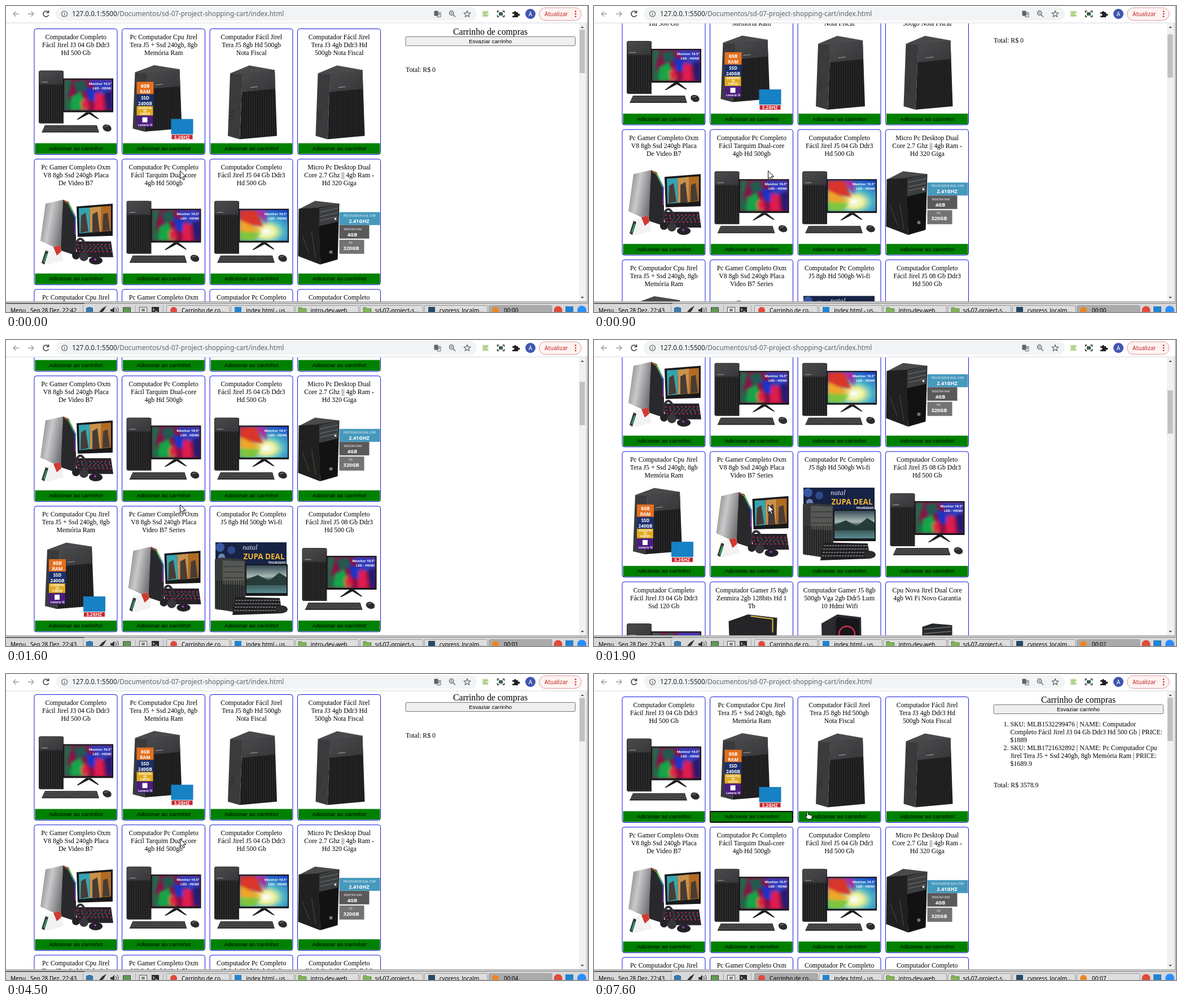
Animation of 1031x543 px, one loop 8000 ms. Source, as an HTML page:

```html
<!DOCTYPE html>
<html lang="pt">
<meta charset="utf-8">
<title>Carrinho de compras</title>
<style>
html, body { margin: 0; width: 100%; height: 100%; overflow: hidden; background: #fff; }
svg { display: block; }
#stage { width: 1031px; height: 543px; }
.serif { font: 11.8px "Liberation Serif", serif; }
.sans { font: 9.87px "Liberation Sans", sans-serif; }
.ui { font: 10px "Noto Sans", sans-serif; }
.url { font: 11.75px "Noto Sans", sans-serif; }
.label { font: bold 8px "Open Sans", sans-serif; fill: #fff; }
.mid { text-anchor: middle; }
</style>
<svg id="stage" viewBox="0 0 1031 543">
<defs>
  <pattern id="grille" width="4" height="4" patternUnits="userSpaceOnUse"><path d="M0 0h2v4h-2z" fill="#111" opacity=".55"/></pattern>
  <filter id="soft"><feGaussianBlur stdDeviation="2.5"/></filter>
  <linearGradient id="silver" x2="1" y2=".4"><stop stop-color="#777"/><stop offset=".5" stop-color="#c9c9cb"/><stop offset="1" stop-color="#77787a"/></linearGradient>
  <linearGradient id="panel" y2="1"><stop stop-color="#4b4b4d"/><stop offset="1" stop-color="#37373a"/></linearGradient>
  <linearGradient id="rgb" x2="1" y2="1"><stop stop-color="#d33"/><stop offset=".35" stop-color="#5c4"/><stop offset=".7" stop-color="#38c"/><stop offset="1" stop-color="#b3c"/></linearGradient>
  <linearGradient id="lake" x2="0" y2="1"><stop stop-color="#354a55"/><stop offset=".4" stop-color="#a9b9b5"/><stop offset=".55" stop-color="#2c4038"/><stop offset="1" stop-color="#5a8a93"/></linearGradient>
  <radialGradient id="glow" cx=".55" cy=".7" r=".75"><stop stop-color="#fff"/><stop offset=".25" stop-color="#e8ef9a"/><stop offset=".5" stop-color="#4cb4c8"/><stop offset="1" stop-color="#1a49c8"/></radialGradient>

  <g id="kit">
    <path d="M8 76l2-2h38l4 1v93h-42l-2-2z" fill="#2b2b2d"/>
    <path d="M9 75h42v23h-42z" fill="url(#panel)"/>
    <path d="M9 100h42v66h-42z" fill="url(#grille)"/>
    <path d="M13 94h11v1h-11z" fill="#aaa"/>
    <path d="M51 88h89v60h-89z" fill="#161618"/>
    <path d="M92 148h8l15 12h-3l-15-9-19 10h-3z" fill="#1c1c1e"/>
    <path d="M19 171h92l4 13h-102z" fill="#343436"/>
    <path d="M19 174h91M18 177h94M16 180h97" stroke="#888" stroke-width=".8" stroke-dasharray="3 1.2"/>
    <ellipse cx="129" cy="176" rx="8" ry="6" fill="#2c2c2e" transform="rotate(20 129 176)"/>
    <path d="M124 174l7-2" stroke="#999"/>
  </g>
  <g id="caption" class="mid label" style="font-size:6px"><text x="117" y="99">Monitor 19.5"</text><text x="120" y="107">LED - HDMI</text></g>
  <g id="combo">
    <use href="#kit"/>
    <svg x="53" y="90" width="85" height="55"><path d="M0 0h85v55h-85z" fill="#8c1146"/>
      <g filter="url(#soft)"><path d="M0 0h14l-8 30 12 25h-18z" fill="#1e6c4a"/><path d="M12 30l18-8 12 33h-30z" fill="#16a548"/><path d="M16 4l22-4 2 18-18 6z" fill="#215a50"/><path d="M38 14l20 4-3 22-12-4z" fill="#1835c9"/><path d="M42 0h43v18l-20 10z" fill="#303dbb"/><path d="M56 24l12 2 3 29h-18z" fill="#e01b50"/><path d="M72 22l13-2v35h-9z" fill="#1b1f78"/><path d="M30 40l9-8 6 18-12 5z" fill="#e02343"/></g></svg>
    <use href="#caption"/>
  </g>
  <g id="rainbow">
    <use href="#kit"/>
    <svg x="53" y="90" width="85" height="55"><path d="M0 0h85v55h-85z" fill="url(#glow)"/>
      <g filter="url(#soft)"><path d="M0 0h30l12 30-42-6z" fill="#d9352c"/><path d="M0 18l40 18-40 8z" fill="#f0a52c"/><path d="M0 38l38 2-12 15h-26z" fill="#7fc53c"/><path d="M28 0h18l2 26z" fill="#b02a9c"/></g></svg>
    <use href="#caption"/>
  </g>
  <g id="tower">
    <path d="M36 79l34-14 45 8-57 9z" fill="#4a4a4c"/>
    <path d="M36 79l22 2-5 115-21-6z" fill="#3b3b3d"/>
    <path d="M58 81l57-8 4 117-66 6z" fill="#262628"/>
    <path d="M58 81l57-8 1 33-59 6z" fill="url(#panel)"/>
    <path d="M57 113l59-6 2 82-64 6z" fill="url(#grille)"/>
    <path d="M72 104l13-1.500" stroke="#aaa"/><path d="M36 150l8-6M36 156l8-6M36 162l8-6" stroke="#222"/>
  </g>
  <g id="offer">
    <use href="#tower" transform="translate(-13 6) scale(1 .9)"/>
    <path d="M26 94h30v22h-30z" fill="#e4701e"/><path d="M26 116h30v21h-30z" fill="#1b2f6b"/><path d="M26 137h29v17h-29z" fill="#e0aa20"/><path d="M26 154h29v20h-29z" fill="#4b1d80"/>
    <g class="mid label"><text x="41" y="104">8GB</text><text x="41" y="114">RAM</text><text x="41" y="125">SSD</text><text x="41" y="135">240GB</text>
    <g style="font-size:4.500px"><text x="41" y="142">GARANTIA</text><text x="41" y="147">DE</text><text x="41" y="152">6 MESES</text><text x="41" y="172">Lumaria 10</text></g></g>
    <path d="M36 157h9v9h-9z" fill="#fff"/>
    <path d="M87 160h39v27h-39z" fill="#1681c4"/><path d="M88 188h37v8h-37z" fill="#c9232c"/>
    <text x="106" y="195" class="mid label">3.2GHZ</text>
  </g>
  <g id="gamer">
    <path d="M20 79l31-7-3 90-37-17z" fill="url(#silver)"/>
    <path d="M51 72l10 4 13 27v68l-27-9z" fill="#29292c"/>
    <path d="M52 73l9 6 12 25v30" fill="none" stroke="url(#rgb)" stroke-width="2"/>
    <path d="M75 84l64-5v57l-62 2z" fill="#19191b"/>
    <path d="M79 87l19-1 1 44-19 2z" fill="#35a4b2"/><path d="M98 86l20-2v45l-19 1z" fill="#c8924c"/><path d="M118 84l18-1v44l-18 2z" fill="#b16b23"/>
    <path d="M83 100l8-5 5 33-14 3zM103 98l9-5 4 36-13 1zM122 98l8-3 4 31-13 2z" fill="#493c35"/>
    <path d="M72 146h64l4 28h-62z" fill="#27212a"/><path d="M76 152h60M77 158h61M79 164h60" stroke="#a3344e" stroke-width="2" stroke-dasharray="3 4"/><path d="M84 155h54M88 161h46" stroke="#2a8a86" stroke-width="1.500" stroke-dasharray="2 6"/>
    <path d="M72 166q2-28 12-24 10 8 6 26" fill="none" stroke="#303034" stroke-width="4"/><circle cx="74" cy="171" r="7" fill="#232326"/><circle cx="88" cy="173" r="8" fill="#37373b"/>
    <ellipse cx="109" cy="180" rx="12" ry="7" fill="#222226"/><circle cx="108" cy="178" r="2" fill="#a3c"/>
    <path d="M19 160l27-7 6 27-30 8z" fill="#f2f2f2"/><path d="M34 156l12-3 2 11-8 7z" fill="#d03a30"/><path d="M13 184l7-22 5 2-7 23z" fill="#333"/><path d="M16 182l5-15 2 1-5 16z" fill="#2aa566"/>
  </g>
  <g id="micro">
    <path d="M2 89l29-15 43 5-36 8z" fill="#4a4a48"/><path d="M2 88l36-2 2 101-39-15z" fill="#20201f"/><path d="M37 86l37-7-3 99-31 9z" fill="#121213"/>
    <path d="M38 87l35-8-1 32-34 8z" fill="#3c3d3e"/><path d="M40 94l32-7M40 102l32-7M40 109l31-7" stroke="#77797a"/><circle cx="67" cy="106" r="2" fill="#ddd"/><circle cx="59" cy="165" r="3" fill="#777"/><path d="M8 135l13 34M25 130l7 46" stroke="#4b4b4a"/>
    <path d="M74 94h72v23h-72z" fill="#4699bd"/><path d="M74 117h53v24h-53z" fill="#59595b"/><path d="M74 143h44v25h-44z" fill="#727375"/>
    <g class="mid label" style="font-size:9px"><text x="109" y="113">2.41GHZ</text><text x="97" y="137">4GB</text><text x="95" y="161">320GB</text>
    <g style="font-size:4.500px;font-weight:400"><text x="110" y="102">PROCESSADOR DUAL CORE</text><text x="98" y="126">MEMÓRIA RAM</text><text x="94" y="150">HD</text></g></g>
  </g>
  <g id="sale">
    <path d="M10 64h126v42h-126z" fill="#172345"/><circle cx="18" cy="73" r="8" fill="#3957a0"/><circle cx="38" cy="78" r="7" fill="#2f4888"/><circle cx="21" cy="90" r="6" fill="#6d83b7"/>
    <text x="58" y="77" style="font:italic 13px 'Liberation Serif',serif" fill="#dce4f5">natal</text>
    <text x="96" y="94" class="mid label" style="font-size:13.500px;fill:#f2b632">ZUPA DEAL</text><text x="119" y="102" class="mid label" style="font-size:6px">THURSDAY</text>
    <path d="M63 103h75v56h-75z" fill="#17191c"/><path d="M65 105h71v49h-71z" fill="url(#lake)"/><path d="M65 130l20-8 20 10 18-14 13 8v14h-71z" fill="#263c38"/>
    <path d="M9 94l12-3 42 4v96l-54-9z" fill="#38393a"/><path d="M23 96l38 2v42l-38-2z" fill="#565855"/><path d="M24 107h36M24 117h36M24 127h36" stroke="#292a2a"/><path d="M10 132h51v52h-51z" fill="url(#grille)"/>
    <path d="M45 161l79 2 4 27-88 3z" fill="#202022"/><path d="M46 167h78M45 173h80M44 179h82M43 185h84" stroke="#737377" stroke-width="2" stroke-dasharray="3.500 1.500"/><ellipse cx="127" cy="183" rx="11" ry="7" fill="#2c2c2e"/>
  </g>
  <g id="gold"><path d="M33 70l34-12 52 6-4 120h-78z" fill="#252528"/><path d="M72 61l39 5v24" fill="none" stroke="#d9bd45" stroke-width="2"/></g>
  <g id="ring"><path d="M42 74l28-16 42 5 2 120h-70z" fill="#2b2b30"/><path d="M68 63l41 3v100h-44z" fill="#17171a"/><circle cx="87" cy="93" r="14" fill="none" stroke="#d52b50" stroke-width="2.500"/></g>
  <g id="slim"><path d="M65 80l18-6 35 3v100h-53z" fill="#27282a"/><path d="M68 84l48-4M68 92l48-4" stroke="#606264" stroke-width="2"/></g>
  <clipPath id="view"><path d="M0 31h1015v493h-1015z"/></clipPath>
</defs>
<path d="M0 0h1031v543h-1031z" fill="#fff"/>
<g clip-path="url(#view)"><g id="page"></g></g>
<g id="frame"></g>
<g id="cursors">
  <path id="arrow" d="M.5 .5v14l3.300-3 2.400 5.200 2.300-1-2.300-5h4.500z" fill="#fff" stroke="#000"/>
  <path id="hand" d="M4 1.500q1.500-1.500 2.500 0v4l6 1.500q1 .5 .8 2.500l-1 4h-6.500l-4.800-5q0-1.500 3 0z" fill="#fff" stroke="#000"/>
</g>
</svg>
<script>
const $ = id => document.getElementById(id);
const text = (x, y, s, cls, extra = '') => `<text x="${x}" y="${y}" class="${cls}" ${extra}>${s}</text>`;
const rect = (x, y, w, h, fill, extra = '') => `<rect x="${x}" y="${y}" width="${w}" height="${h}" fill="${fill}" ${extra}/>`;
const dot = (x, y, r, fill) => `<circle cx="${x}" cy="${y}" r="${r}" fill="${fill}"/>`;
const line = (d, color, w = 1.4) => `<path d="${d}" fill="none" stroke="${color}" stroke-width="${w}"/>`;

const products = [
  ['combo', 'Computador Completo|Fácil Jirel J3 04 Gb Ddr3|Hd 500 Gb'],
  ['offer', 'Pc Computador Cpu Jirel|Tera J5 + Ssd 240gb, 8gb|Memória Ram'],
  ['tower', 'Computador Fácil Jirel|Tera J5 8gb Hd 500gb|Nota Fiscal'],
  ['tower', 'Computador Fácil Jirel|Tera J3 4gb Ddr3 Hd|500gb Nota Fiscal'],
  ['gamer', 'Pc Gamer Completo Oxm|V8 8gb Ssd 240gb Placa|De Video B7'],
  ['combo', 'Computador Pc Completo|Fácil Tarquim Dual-core|4gb Hd 500gb'],
  ['rainbow', 'Computador Completo|Fácil Jirel J5 04 Gb Ddr3|Hd 500 Gb'],
  ['micro', 'Micro Pc Desktop Dual|Core 2.7 Ghz || 4gb Ram -|Hd 320 Giga'],
  ['offer', 'Pc Computador Cpu Jirel|Tera J5 + Ssd 240gb, 8gb|Memória Ram'],
  ['gamer', 'Pc Gamer Completo Oxm|V8 8gb Ssd 240gb Placa|Video B7 Series'],
  ['sale', 'Computador Pc Completo|J5 8gb Hd 500gb Wi-fi'],
  ['combo', 'Computador Completo|Fácil Jirel J5 08 Gb Ddr3|Hd 500 Gb'],
  ['combo', 'Computador Completo|Fácil Jirel J3 04 Gb Ddr3|Ssd 120 Gb'],
  ['gold', 'Computador Gamer J5 8gb|Zenmira 2gb 128bits Hd 1|Tb'],
  ['ring', 'Computador Gamer J5 8gb|500gb Vga 2gb Ddr5 Lum|10 Hdmi Wifi'],
  ['slim', 'Cpu Nova Jirel Dual Core|4gb Wi Fi Novo Garantia'],
];

function card([art, title], i) {
  const lines = title.replace('||', '\u2016').split('|').map(s => s.replace('\u2016', '||'));
  return `<g transform="translate(${50 + i % 4 * 155.5} ${40.5 + (i >> 2) * 231.2})">`
    + rect(0, 0, 147, 223, '#fff', 'rx="4" stroke="#1414e0"')
    + lines.map((s, n) => text(73.7, 18.5 + n * 14, s, 'serif mid')).join('')
    + `<use href="#${art}"/>` + rect(1.5, 203, 144.500, 19, '#008000')
    + text(74, 215.5, 'Adicionar ao carrinho!', 'sans mid') + '</g>';
}

const cart = [
  ['SKU: MLB1532299476 | NAME: Computador', 'Completo Fácil Jirel J3 04 Gb Ddr3 Hd 500 Gb | PRICE:', '$1889'],
  ['SKU: MLB1721632892 | NAME: Pc Computador Cpu', 'Jirel Tera J5 + Ssd 240gb, 8gb Memória Ram | PRICE:', '$1689.9'],
];
const totals = ['0', '1889', '3578.9'];

$('page').innerHTML = products.map(card).join('')
  + text(858, 50.5, 'Carrinho de compras', 'serif mid', 'style="font-size:15.750px"')
  + rect(708, 54.5, 300.5, 16, '#efefef', 'rx="2" stroke="#767676"')
  + text(858, 66, 'Esvaziar carrinho', 'sans mid')
  + cart.map((rows, i) => `<g id="item${i}">` + text(725.5, 93 + i * 42, i + 1 + '.', 'serif')
    + rows.map((s, n) => text(737.5, 93 + i * 42 + n * 14, s, 'serif')).join('') + '</g>').join('')
  + text(708, 117, '', 'serif', 'id="total"')
  + rect(50.3, 243.8, 146.2, 19.2, 'none', 'id="focus" rx="2" stroke="#000" stroke-width="1.8"');

const grey = '#5f6368', dark = '#3c4043';
const tabs = ['Carrinho de co...', 'index.html - us...', 'intro-dev-web', 'sd-07-project-s...', 'cypress_localm...', ''];
const folder = x => `<path d="M${x - 7} 535h5l2 2h7v8h-14z" fill="#83b457" stroke="#5d8c38"/>`;
const tabX = i => 284.5 + i * 114.2;

$('frame').innerHTML =
  // browser bar
  rect(0, 0, 1031, 30, '#fff') + rect(88, 2, 746, 24, '#f1f3f4', 'rx="12"') + rect(0, 29.5, 1031, 1, '#d5d7da')
  + line('M23 14h-10M17.500 9.500l-4.500 4.500 4.500 4.500M39 14h10M44.500 9.500l4.500 4.500-4.500 4.500', '#9a9da1')
  + line('M75 11a5 5 0 1 0 .6 5M75.500 8v4h-4', dark, 1.6)
  + line('M98.500 14a5 5 0 1 0 10 0a5 5 0 1 0-10 0M103.500 13v4M103.500 10.500v1.300', grey, 1.2)
  + text(117, 18.2, `127.0.0.1:5500<tspan fill="${grey}">/Documentos/sd-07-project-shopping-cart/index.html</tspan>`, 'url', 'fill="#202124"')
  + rect(758.5, 8.5, 7, 9, grey, 'rx="1"') + line('M764 11.500h6v8h-6zM765 14h4M767 13v4', grey, 1)
  + line('M785.500 12.500a3.700 3.700 0 1 0 7.400 0a3.700 3.700 0 1 0-7.400 0M792 15.500l4 4M787.500 12.500h3.500', grey)
  + line('M817 8.500l1.600 3.700 4 .3-3 2.600 1 4-3.600-2.100-3.600 2.100 1-4-3-2.600 4-.3z', grey, 1.2)
  + rect(843, 8, 12, 12, '#e4efd5') + line('M845 11h9M845 14h7M845 17h9', '#83b94b')
  + line('M870.500 12v-3h3M879.500 9h3v3M882.500 16v3h-3M873.500 19h-3v-3', '#252525') + rect(873, 11, 7, 6, '#3f5f50')
  + `<path d="M897 11h3a2 2 0 1 1 4 0h3v3a2 2 0 1 1 0 3v3h-10v-3a2 2 0 1 0 0-3z" fill="#222"/>`
  + dot(929, 14, 9, '#3f55b0') + text(929, 17.7, 'A', 'ui mid', 'fill="#fff"')
  + rect(944.5, 3, 74.500, 22.500, '#fdf3f2', 'rx="11.200" stroke="#d99a96"')
  + text(954, 17.6, 'Atualizar', 'ui', 'fill="#c5221f"') + [9.5, 14, 18.5].map(y => dot(1009, y, 1.3, '#c5221f')).join('')
  // scrollbar and window edge
  + rect(1015, 31, 12, 493, '#f1f1f1') + rect(1016, 42, 9.5, 77, '#c1c1c1', 'id="thumb"')
  + `<path d="M1018 39l3-3 3 3zM1018 516l3 3 3-3z" fill="#505050"/>`
  + rect(1027, 30, 4, 495, '#e4e4e4') + rect(1029.5, 0, 1.5, 525, '#aaa')
  // taskbar
  + rect(0, 524, 1031, 19, '#d8d8d8') + rect(0, 524, 1031, 1.500, '#aaa') + rect(0, 527, 139, 1.500, '#3a3a3a') + rect(139, 527, 892, 1.200, '#8c8c8c')
  + text(8, 543.500, 'Menu', 'ui') + text(43, 543.500, '', 'ui', 'id="clock"')
  + `<path d="M148 533l7 2v10h-14v-10z" fill="#3c78a8" stroke="#fff"/><path d="M165 543l5-6 8-5-5 9-5 4z" fill="#333"/><path d="M185 538h3l4-4v11l-4-3h-3z" fill="#333"/>`
  + line('M194 536q3 4 0 8M197 534q4 6 0 10', '#333', 1) + rect(207.500, 535, 13, 10, '#5d9b50', 'stroke="#444"')
  + rect(236.5, 534.5, 13, 10, '#eee', 'stroke="#555"') + rect(240, 537, 6, 5, '#888') + rect(258, 534, 13, 11, '#2c2c2c') + line('M260 537l3 2-3 2M264 542h4', '#fff', 1)
  + line('M136.500 531v12M229.500 531v12M278.500 531v12', '#aaa', 1)
  + tabs.map((s, i) => rect(tabX(i), 531.5, 111.500, 20, '#dedede', `id="tab${i}" rx="2" stroke="#9b9b9b"`)
    + text(tabX(i) + 26.5, 543.500, s, 'ui', i == 5 ? 'id="timer"' : '')).join('')
  + dot(297, 540, 6, '#df4a3c') + rect(405, 534, 12, 12, '#2184cf') + folder(525) + folder(640) + rect(748, 534, 12, 12, '#254a68') + dot(867, 540, 6, '#ec8526')
  + dot(978, 540, 7.5, '#df4a3c') + rect(991, 533, 14, 14, '#2184cf') + dot(1020, 540, 8, '#2d8cff');

// Each track is a list of [time in ms, value]; values hold until the next one.
const scrolls = [[0, 0], [700, 6], [800, 26], [900, 52.5], [1000, 80], [1100, 106], [1200, 119],
  [1400, 132], [1500, 166], [1600, 208], [1700, 250], [1800, 285], [1900, 305],
  [4000, 87], [4300, 48], [4400, 17], [4500, 4], [4900, 2], [5000, 0]];
const pointer = [[0, [308, 292]], [4900, [274, 282]], [5000, [237, 274]], [5200, [197, 269]], [5400, [171, 250]],
  [5600, [169, 244]], [6300, [215, 244]], [6500, [239, 244]], [6800, [236, 244]], [7400, [280, 244]], [7500, [340, 244]], [7600, [373, 244]]];
const seconds = [[0, 0], [1200, 1], [1900, 2], [4000, 4], [5000, 5], [6100, 6], [7100, 7]];
const at = (track, t) => track.findLast(k => k[0] <= t)[1];
const show = (id, on) => $(id).setAttribute('visibility', on ? 'visible' : 'hidden');

function draw(now) {
  const t = now % 8000, y = at(scrolls, t), count = (t >= 6100) + (t >= 7100);
  const active = t >= 5600 ? 0 : 5;
  $('page').setAttribute('transform', `translate(0 ${-y})`);
  $('thumb').setAttribute('y', 42 + y * .155);
  $('cursors').setAttribute('transform', `translate(${at(pointer, t)})`);
  show('arrow', t < 5400);
  show('hand', t >= 5400);
  show('focus', t >= 5600);
  $('focus').setAttribute('x', t < 6800 ? 50.3 : 205.8);
  cart.forEach((_, i) => show('item' + i, count > i));
  $('total').textContent = 'Total: R$ ' + totals[count];
  $('total').setAttribute('y', 117 + count * 42);
  $('clock').textContent = 'Seg 28 Dez, 22:4' + (t < 700 ? 2 : 3);
  $('timer').textContent = '00:0' + at(seconds, t);
  tabs.forEach((_, i) => $('tab' + i).setAttribute('fill', i == active ? '#ababab' : '#dedede'));
  requestAnimationFrame(draw);
}
draw(0);
</script>
</html>
```
